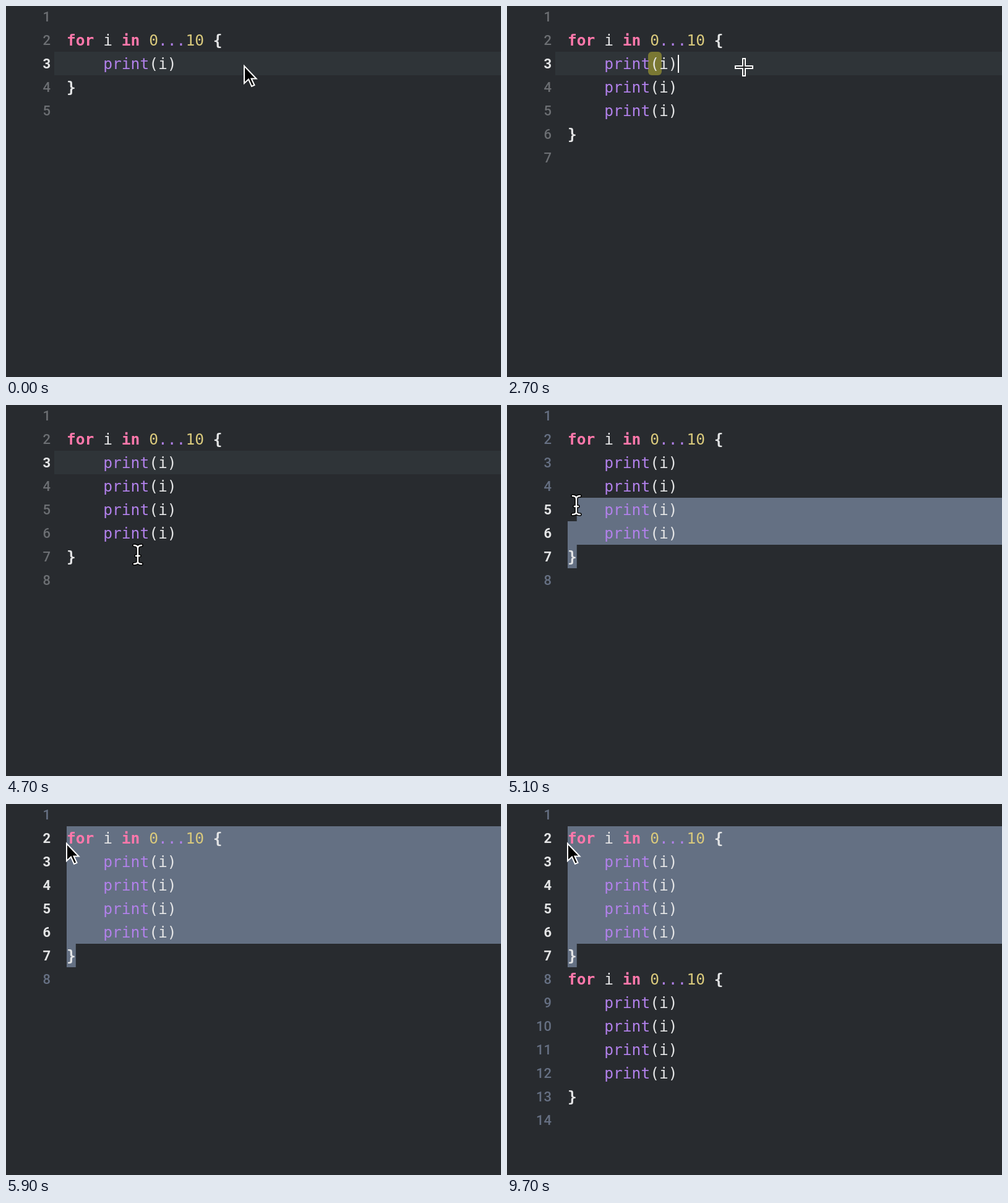
Animation, 800 px wide and 600 px high, one loop 9.8 s. Source, as an HTML page with a canvas:

```html
<!DOCTYPE html>
<html lang="en">
<head>
<meta charset="utf-8">
<title>Duplicating lines in an editor</title>
<style>
  html, body { margin: 0; width: 100%; height: 100%; overflow: hidden; background: #282b2f; }
  canvas { display: block; }
</style>
</head>
<body>
<canvas id="stage" width="800" height="600"></canvas>
<script>
const ctx = document.getElementById('stage').getContext('2d');
const LOOP = 9800, STEP = 100;
const ROW = 38, LEFT = 98, CHAR = 14.8;
const COLOR = {
  back: '#282b2f', line: '#2f3438', select: '#647083', white: '#e4e5e6',
  pink: '#ff78ab', purple: '#b281eb', yellow: '#d9c97c',
  number: '#6c6f73', numberBlue: '#667083'
};
const CODE_FONT = '24.6px "DejaVu Sans Mono", monospace';
const NUMBER_FONT = '22px Roboto, sans-serif';

// Each token: column, text, colour, bold
const LOOP_HEAD = [
  [0, 'for', 'pink', true], [4, 'i', 'white'], [6, 'in', 'pink', true],
  [9, '0', 'yellow'], [10, '...', 'purple'], [13, '10', 'yellow'], [16, '{', 'white', true]
];
const PRINT = [[4, 'print', 'purple'], [9, '(i)', 'white']];
const LOOP_END = [[0, '}', 'white', true]];

const FLASHES = [1900, 2500, 3400];
const COPY_DELAY = 200;
const BLOCK_COPY = 7500, DRAG_START = 4900;

const CARET = [
  [500, 0], [800, 1], [900, 1], [1300, 0], [1400, 0], [1700, 1], [1800, 1], [2300, 0],
  [2400, 0], [2700, 1], [2900, 1], [3200, 0], [3500, 0], [3700, 1], [3800, 1], [4200, 0]
];
const POINTER = [
  [4000, 383, 99], [4700, 213, 242], [4900, 112, 246], [5300, 112, 78], [5500, 97, 62]
];

const rowTop = row => row * ROW - 2;
const colX = col => LEFT + col * CHAR;

// Interpolates rows of [time, ...values], holding both ends.
function at(keys, t, ease = k => k) {
  const next = keys.findIndex(key => key[0] > t);
  if (next === 0) return keys[0].slice(1);
  if (next < 0) return keys[keys.length - 1].slice(1);
  const a = keys[next - 1], b = keys[next];
  const k = ease((t - a[0]) / (b[0] - a[0]));
  return a.slice(1).map((v, i) => v + (b[i + 1] - v) * k);
}

function documentLines(t) {
  const copies = FLASHES.filter(start => t >= start + COPY_DELAY).length;
  const block = [LOOP_HEAD, ...Array(copies + 1).fill(PRINT), LOOP_END];
  return [[], ...block, ...(t >= BLOCK_COPY ? block : []), []];
}

function selectionAt(t, x, y) {
  if (t < DRAG_START) return null;
  const row = Math.floor((y + 2) / ROW);
  const col = Math.max(0, Math.round((x - LEFT) / CHAR));
  return row < 6 ? { row, col, endRow: 6, endCol: 1 } : null;
}

function rect(x, y, w, h, color) {
  ctx.fillStyle = color;
  ctx.fillRect(x, y, w, h);
}

function drawSelection({ row, col, endRow, endCol }) {
  for (let r = row; r <= endRow; r++) {
    const x = r === row ? colX(col) : LEFT;
    const end = r === endRow ? colX(endCol) : 800;
    rect(x, rowTop(r), end - x, ROW, COLOR.select);
  }
}

function drawFlash(t) {
  const start = FLASHES.find(f => t >= f && t < f + 400);
  if (start === undefined) return;
  ctx.globalAlpha = Math.min(1, (start + 400 - t) / 300);
  ctx.fillStyle = '#a09a32';
  ctx.beginPath();
  ctx.roundRect(228, rowTop(2), 22, ROW, 6);
  ctx.fill();
  ctx.globalAlpha = 1;
}

function drawLine(tokens, row, active, idleColor) {
  const base = rowTop(row) + 28;
  ctx.textAlign = 'right';
  ctx.font = (active ? '700 ' : '500 ') + NUMBER_FONT;
  ctx.fillStyle = active ? COLOR.white : idleColor;
  ctx.fillText(row + 1, 72, base - 1);
  ctx.textAlign = 'left';
  for (const [col, text, color, bold] of tokens) {
    ctx.font = (bold ? 'bold ' : '') + CODE_FONT;
    ctx.fillStyle = COLOR[color];
    ctx.fillText(text, colX(col), base);
  }
}

function stroke(path, width, color) {
  ctx.lineWidth = width;
  ctx.strokeStyle = color;
  ctx.stroke(path);
}

const ARROW = new Path2D('M1 2V30L8 23.5L13 35L17.5 33L12.5 22.5H20.5Z');
const BEAM = new Path2D(
  'M-6-15Q0-15 0-10V11Q0 15-6 15M6-15Q0-15 0-10M6 15Q0 15 0 11M-3 2H3');

function drawPointer(shape, x, y) {
  ctx.save();
  ctx.translate(x, y);
  if (shape === 'arrow') {
    ctx.fillStyle = '#000';
    ctx.fill(ARROW);
    stroke(ARROW, 2, '#fff');
  } else if (shape === 'beam') {
    ctx.lineCap = ctx.lineJoin = 'round';
    stroke(BEAM, 5.5, '#000');
    stroke(BEAM, 2.4, '#fff');
  } else {
    rect(-15, -3, 30, 6, '#fff');
    rect(-3, -15, 6, 30, '#fff');
    rect(-13, -1, 26, 2, '#16181a');
    rect(-1, -13, 2, 26, '#16181a');
  }
  ctx.restore();
}

function pointerShape(t) {
  if (t < 100 || t >= 5500) return 'arrow';
  return t <= 4000 ? 'cross' : 'beam';
}

function draw(t) {
  const ease = k => k * k * (3 - 2 * k);
  const [x, y] = t < 100 ? [384, 95] : at(POINTER, t, ease);
  const selection = selectionAt(t, x, y);
  const currentRow = t < DRAG_START ? 2 : 6;

  rect(0, 0, 800, 600, COLOR.back);
  if (selection) drawSelection(selection);
  else rect(78, rowTop(currentRow), 722, ROW, COLOR.line);
  drawFlash(t);

  documentLines(t).forEach((tokens, row) => {
    const active = selection
      ? row >= selection.row && row <= selection.endRow
      : row === currentRow;
    drawLine(tokens, row, active, selection ? COLOR.numberBlue : COLOR.number);
  });

  ctx.globalAlpha = at(CARET, t)[0];
  rect(276, 79, 2, 29, '#fff');
  ctx.globalAlpha = 1;
  drawPointer(pointerShape(t), x, y);
}

function frame() {
  const t = performance.now() % LOOP;
  draw(Math.floor(t / STEP) * STEP);
  requestAnimationFrame(frame);
}
frame();
</script>
</body>
</html>
```
